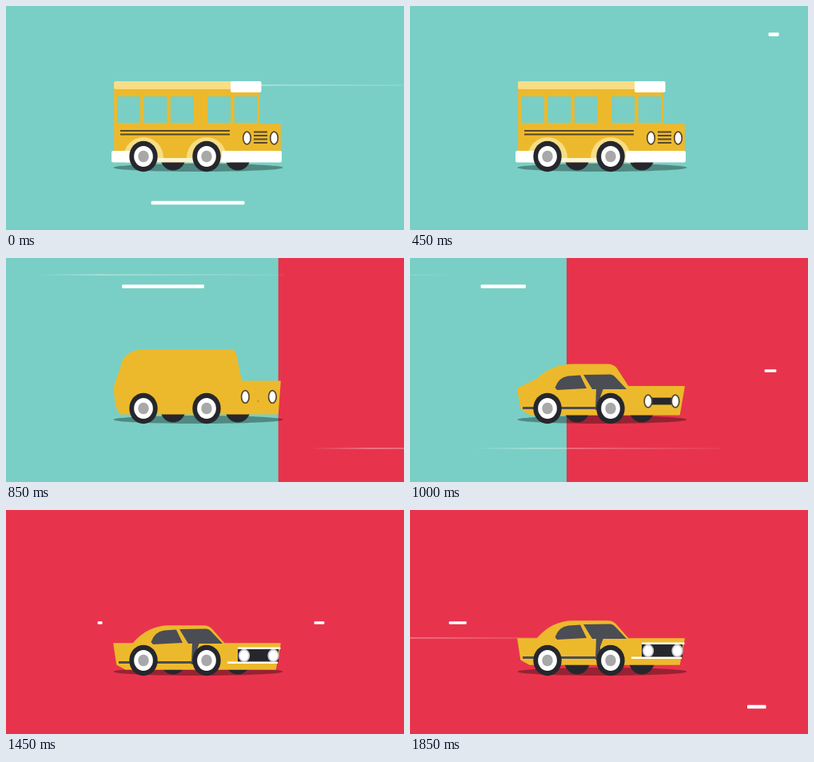
An HTML page for the animation above (1900 ms loop, 498 by 280 pixels).

```html
<!DOCTYPE html>
<html lang="en">
<head>
<meta charset="utf-8">
<title>Bus to car</title>
<style>
  html, body { margin: 0; width: 100%; height: 100%; overflow: hidden; background: #79cfc5; }
  svg { display: block; width: 100%; height: 100%; }
  .part { transform-box: fill-box; transform-origin: center; }
</style>
</head>
<body>
<svg id="stage" viewBox="0 0 498 280">
  <defs>
    <linearGradient id="fade">
      <stop offset="0" stop-color="#fff" stop-opacity="0"/>
      <stop offset=".25" stop-color="#fff" stop-opacity=".38"/>
      <stop offset="1" stop-color="#fff" stop-opacity=".05"/>
    </linearGradient>
  </defs>
</svg>
<script>
const LOOP = 1900, STEP = 50;
const MORPH = 620, LANDED = 1150;
const TEAL = '#79cfc5', RED = '#e7344c', YELLOW = '#edb92c', PALE = '#f7dd85';
const DARK = '#26272d', GLASS = '#4b4d54', LINE = '#57482c', WHITE = '#fff';
const stage = document.getElementById('stage');

function set(el, attrs) {
  for (const name in attrs) el.setAttribute(name, attrs[name]);
  return el;
}
function add(tag, attrs, parent = stage) {
  return parent.appendChild(set(document.createElementNS('http://www.w3.org/2000/svg', tag), attrs));
}
const box = (x, y, width, height, fill, parent, rx = 0) =>
  add('rect', { x, y, width, height, fill, rx, class: 'part' }, parent);
const shape = (d, fill) => add('path', { d, fill, class: 'part' }, shell);
const stroke = (d, color, width) =>
  add('path', { d, stroke: color, 'stroke-width': width, class: 'part' }, shell);

const mix = (a, b, k) => a + (b - a) * k;
const ramp = (t, from, to) => Math.min(1, Math.max(0, (t - from) / (to - from)));
const smooth = k => k * k * (3 - 2 * k);
const sineOut = k => Math.sin(k * Math.PI / 2);

// Backdrop
box(0, 0, 498, 280, TEAL);
const wipe = box(498, 0, 498, 280, RED);

// Dashes draw themselves from right to left: the head eases out, the tail follows later.
const dash = (y, height, from, to, start) =>
  ({ from, to, start, el: box(0, y - height / 2, 0, height, WHITE, stage, 1) });
const dashes = [
  dash(246, 4.5, 447, 60, -327),
  dash(35.5, 4.5, 462, 75, 435),
  dash(141, 3.3, 462, 382, 900),
  dash(141, 3.3, 121, 35, 1418),
  dash(246, 4.5, 447, 60, 1822)
];
function drawDash({ el, from, to, start }, t) {
  const head = mix(from, to, sineOut(ramp(t, start, start + 680)));
  const tail = mix(from, to, smooth(ramp(t, start, start + 775)));
  set(el, { x: head, width: Math.max(0, tail - head) });
}

// Wisps cross at constant speed; exit is when the head reaches the left edge.
const wisp = (y, exit) => ({ exit, el: box(498, y - 0.8, 308, 1.6, 'url(#fade)') });
const wisps = [wisp(99, 125), wisp(21, 870), wisp(238, 1040), wisp(160, 1800)];

// Vehicle
function wheel(cx, size, fill) {
  add('ellipse', { cx, cy: 188, rx: 17.7 * size, ry: 19.3 * size, fill });
}
add('ellipse', { cx: 240.5, cy: 202, rx: 106, ry: 5, fill: '#000', opacity: 0.34 });
for (const x of [209, 290]) wheel(x, 0.91, DARK);

const shell = add('g', {});
const body = add('path', { fill: YELLOW, stroke: YELLOW, 'stroke-width': 1.6, 'stroke-linejoin': 'round' }, shell);

// Clockwise from the rear bottom corner; the curves round the back and the front of the roof.
const outline = ['M', 'L', 'L', 'L', 'Q', ' ', 'L', 'Q', ' ', 'L', 'L', 'L'];
const bus = [[136, 194], [136, 180], [136, 160], [136, 100], [136, 97], [139, 97],
  [313, 97], [316, 97], [316, 100], [316, 148], [343, 148], [343, 194]];
const car = [[150, 196], [139, 190], [135, 164], [159, 164], [178, 142], [204, 142],
  [247, 142], [254, 142], [258, 147], [273, 164], [343, 164], [337, 196]];

function drawBody(t) {
  const slide = smooth(ramp(t, 720, 980));
  const sink = smooth(ramp(t, MORPH, LANDED));
  set(body, {
    d: outline.map((command, i) => {
      const [x, y] = bus[i], [x2, y2] = car[i];
      return `${command}${mix(x, x2, slide)} ${mix(y, y2, sink)}`;
    }).join('') + 'Z'
  });
}

// Bus parts shrink away, car parts grow in.
const leaving = (el, from, to) => ({ el, from, to, size: k => 1 - k * k });
const arriving = (el, from, to) => ({ el, from, to, size: k => k });
const parts = [];

for (const x of [172, 251])
  parts.push(leaving(shape(`M${x - 25} 190A25 26 0 0 1 ${x + 25} 190Z`, PALE), MORPH, 780));
parts.push(leaving(box(135, 94, 150, 10, PALE, shell, 2), MORPH, 740));
for (let i = 0; i < 5; i++) {
  const x = 139 + 33.4 * i + (i > 2 ? 13 : 0);
  parts.push(leaving(box(x, 113, 29, 33, TEAL, shell, 1.5), MORPH, 850));
}
for (const el of [
  box(281, 94, 38.5, 14, WHITE, shell, 2),
  stroke('M143 156H280M143 160.5H280', LINE, 1.8),
  box(150, 190, 130, 5.5, '#fdf3cf', shell),
  box(132, 181, 30, 14.5, WHITE, shell, 2),
  box(270, 181, 75, 14.5, WHITE, shell, 2),
  stroke('M310 157.5h17m-17 4.5h17m-17 4.5h17m-17 4.5h17', LINE, 2)
]) parts.push(leaving(el, 750, 850));

for (const el of [
  shape('M181.5 162Q186 149 198 147.5L213 146.5L221 163L184 165Z', GLASS),
  shape('M217 146L251 145.5Q255 146 257 149L271 164L228 164Z', GLASS),
  stroke('M141 187.5H235', GLASS, 3),
  shape('M233 163H242L238 174V190H232Z', GLASS)
]) parts.push(arriving(el, 860, 1000));
parts.push(arriving(box(290, 171, 51, 16, DARK, shell), 840, 1130));
parts.push(arriving(stroke('M290 169.7H343.5M277 187.7H340', WHITE, 2.5), 1000, 1130));

function drawParts(t) {
  const nudge = 2 * ramp(t, MORPH, 750);
  for (const { el, from, to, size } of parts) {
    const scale = size(ramp(t, from, to));
    const shift = size(0) ? nudge : 0;
    el.style.transform = `translate(${shift}px, ${shift}px) scale(${scale})`;
    el.style.visibility = scale > 0 ? 'visible' : 'hidden';
  }
}

const lamps = [0, 1].map(() => add('ellipse', { fill: WHITE, 'stroke-width': 1.7 }, shell));
function drawLamps(t) {
  const drop = ramp(t, MORPH, 1000), settle = ramp(t, 1000, 1130);
  lamps.forEach((lamp, i) => set(lamp, {
    cx: mix(301.5, 298, drop) + mix(34, 36.5, settle) * i,
    cy: mix(165, 179, drop),
    rx: mix(4.8, 6.3, settle),
    ry: mix(7.8, 7.3, settle),
    stroke: settle < 0.6 ? LINE : '#c9cacd'
  }));
}

for (const x of [172, 251]) {
  wheel(x, 1, DARK);
  wheel(x, 0.67, WHITE);
  wheel(x, 0.38, '#a8a8a8');
}

function render(t) {
  set(wipe, { x: 498 * (1 - ramp(t, 687, 1203)) });
  for (const d of dashes) drawDash(d, t);
  for (const { el, exit } of wisps) set(el, { x: (exit - t) * 2 });
  drawBody(t);
  drawParts(t);
  drawLamps(t);
  const bob = 3 * Math.cos((t - 1450) * Math.PI / 400) * ramp(t, 1000, LANDED);
  set(shell, { transform: `translate(0 ${bob})` });
}

const start = performance.now();
function tick() {
  const t = (performance.now() - start) % LOOP;
  render(Math.floor(t / STEP) * STEP);
  requestAnimationFrame(tick);
}
tick();
</script>
</body>
</html>
```
